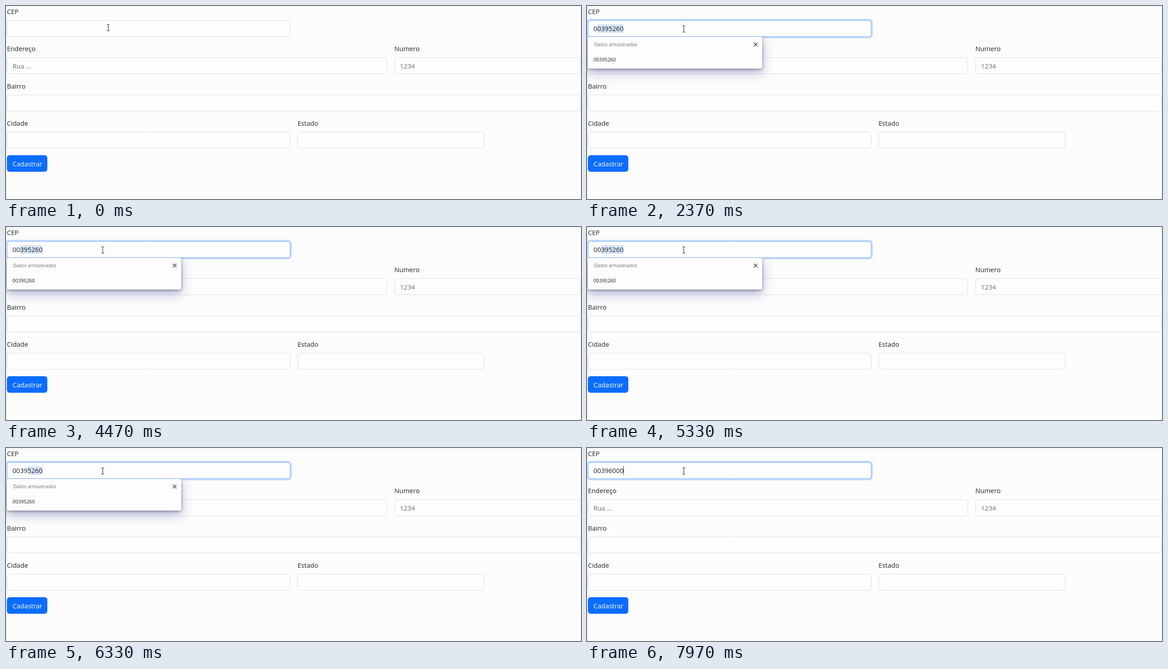
An HTML page with a canvas for the animation above (8000 ms loop, 1280 by 432 pixels).

```html
<!DOCTYPE html>
<html lang="pt-BR">
<head>
<meta charset="utf-8">
<title>Cadastro</title>
<style>
html, body { margin: 0; width: 100%; height: 100%; overflow: hidden; background: #fcfcfc; }
canvas { display: block; }
</style>
</head>
<body>
<canvas id="stage" width="1280" height="432"></canvas>
<script>
const ctx = document.getElementById('stage').getContext('2d');
const LOOP = 8000;
const FAMILY = '"Open Sans", "Noto Sans", sans-serif';
const INK = '#212529';
const PAPER = '#fcfcfc';
const SAVED = '00395260';
const TYPED = '00396000';
const KEYS = [2200, 4300, 5500, 6250, 6680, 7200, 7480, 7760];
const CLICK = 600, MENU_IN = 760, MENU_OUT = 6680;

const clamp = v => Math.max(0, Math.min(1, v));
const ease = v => { v = clamp(v); return v * v * (3 - 2 * v); };

function text(str, x, y, size = 14.6, color = INK) {
  ctx.font = `${size}px ${FAMILY}`;
  ctx.fillStyle = color;
  ctx.fillText(str, x, y);
}

function box(x, y, w, h, r) {
  ctx.beginPath();
  ctx.roundRect(x, y, w, h, r);
}

function line(x1, y1, x2, y2) {
  ctx.beginPath();
  ctx.moveTo(x1, y1);
  ctx.lineTo(x2, y2);
  ctx.stroke();
}

function field(label, x, y, w, hint) {
  text(label, x, y - 14);
  box(x + 0.5, y + 0.5, w - 1, 36, 5.5);
  ctx.fillStyle = '#fdfdfd';
  ctx.fill();
  ctx.strokeStyle = '#dbdce5';
  ctx.lineWidth = 1;
  ctx.stroke();
  if (hint) text(hint, x + 12.5, y + 24.5, 14.6, '#6a6d70');
}

function form() {
  ctx.fillStyle = PAPER;
  ctx.fillRect(0, 0, 1280, 432);
  ctx.fillStyle = '#f6f6da';
  ctx.fillRect(0, 0, 2, 432);
  ctx.strokeStyle = '#eeeedd';
  ctx.lineWidth = 1;
  box(1.5, 0.5, 1278, 450, 6);
  ctx.stroke();

  field('CEP', 2, 32, 631);
  field('Endereço', 2, 115, 846, 'Rua ...');
  field('Numero', 864.5, 115, 415, '1234');
  field('Bairro', 2, 198.5, 1277.5);
  field('Cidade', 2, 282, 631);
  field('Estado', 649, 282, 416);

  box(2, 334, 90, 37, 6);
  ctx.fillStyle = '#0b6dfe';
  ctx.fill();
  text('Cadastrar', 14.5, 358.5, 14.6, '#fff');
}

function focusRing(alpha) {
  ctx.save();
  ctx.globalAlpha = alpha;
  ctx.strokeStyle = '#c2dafc';
  ctx.lineWidth = 3.5;
  box(0.5, 30.5, 634, 40, 7);
  ctx.stroke();
  ctx.strokeStyle = '#86b7fe';
  ctx.lineWidth = 1;
  box(2.5, 32.5, 630, 36, 5.5);
  ctx.stroke();
  ctx.restore();
}

function entry(t) {
  const count = KEYS.filter(k => t >= k).length;
  const typed = TYPED.slice(0, count);
  const completing = count > 0 && SAVED.startsWith(typed);
  const shown = completing ? SAVED : typed;
  ctx.font = `14.6px ${FAMILY}`;
  const edge = 14.5 + ctx.measureText(typed).width;
  const end = 14.5 + ctx.measureText(shown).width;
  if (completing) {
    ctx.fillStyle = '#d5e5f8';
    ctx.fillRect(edge, 41, end - edge, 19);
  }
  text(shown, 14.5, 56);

  // The caret restarts its blink with every key
  const since = t - (count ? KEYS[count - 1] : CLICK);
  if (!completing && since >= 0 && since % 1000 < 500) {
    ctx.fillStyle = '#111';
    ctx.fillRect(Math.round(end), 41, 1, 19);
  }
}

function panel() {
  box(2, 69, 388, 71, 4);
  ctx.fillStyle = '#fdfdfd';
}

function shadow(blur, dy, color) {
  ctx.shadowBlur = blur;
  ctx.shadowOffsetY = dy;
  ctx.shadowColor = color;
  panel();
  ctx.fill();
}

// Shadows are kept outside the panel so none shows through while it fades
function shadows() {
  ctx.save();
  panel();
  ctx.rect(-50, 0, 1400, 500);
  ctx.clip('evenodd');
  shadow(26, 9, 'rgba(75, 75, 165, 0.4)');
  shadow(6, 2, 'rgba(50, 50, 60, 0.48)');
  ctx.restore();
}

function menu(t) {
  const alpha = Math.min(ease((t - MENU_IN) / 160), 1 - ease((t - MENU_OUT) / 180));
  if (alpha <= 0) return;
  const scale = 0.96 + 0.04 * alpha;
  ctx.save();
  ctx.beginPath();
  ctx.rect(0, 68, 1280, 364);
  ctx.clip();
  ctx.globalAlpha = alpha;
  ctx.translate(196, 104);
  ctx.scale(scale, scale);
  ctx.translate(-196, -104);
  shadows();
  panel();
  ctx.fill();
  text('Dados armazenados', 16, 90, 10, '#6b6b6b');
  text(SAVED, 14.5, 123.5, 10.9, '#1b1b1b');
  ctx.strokeStyle = '#333';
  ctx.lineWidth = 1.2;
  line(371, 82, 379.5, 90.5);
  line(379.5, 82, 371, 90.5);
  ctx.restore();
}

function pointer(t) {
  const p = ease((t - 30) / 450);
  const x = Math.round(227 - 12 * p) + 0.5;
  const y = Math.round(48 + 3 * p) + 0.5;
  ctx.strokeStyle = '#111';
  ctx.lineWidth = 1;
  line(x, y - 7, x, y + 7);
  for (const end of [-7.5, 7.5]) {
    const row = y + end - Math.sign(end) * 0.5;
    line(x - 3, row, x - 0.5, row);
    line(x + 0.5, row, x + 3, row);
  }
}

function draw(now) {
  const t = now % LOOP;
  form();
  focusRing(ease((t - CLICK) / 150));
  entry(t);
  menu(t);
  pointer(t);
  requestAnimationFrame(draw);
}

requestAnimationFrame(draw);
</script>
</body>
</html>
```
